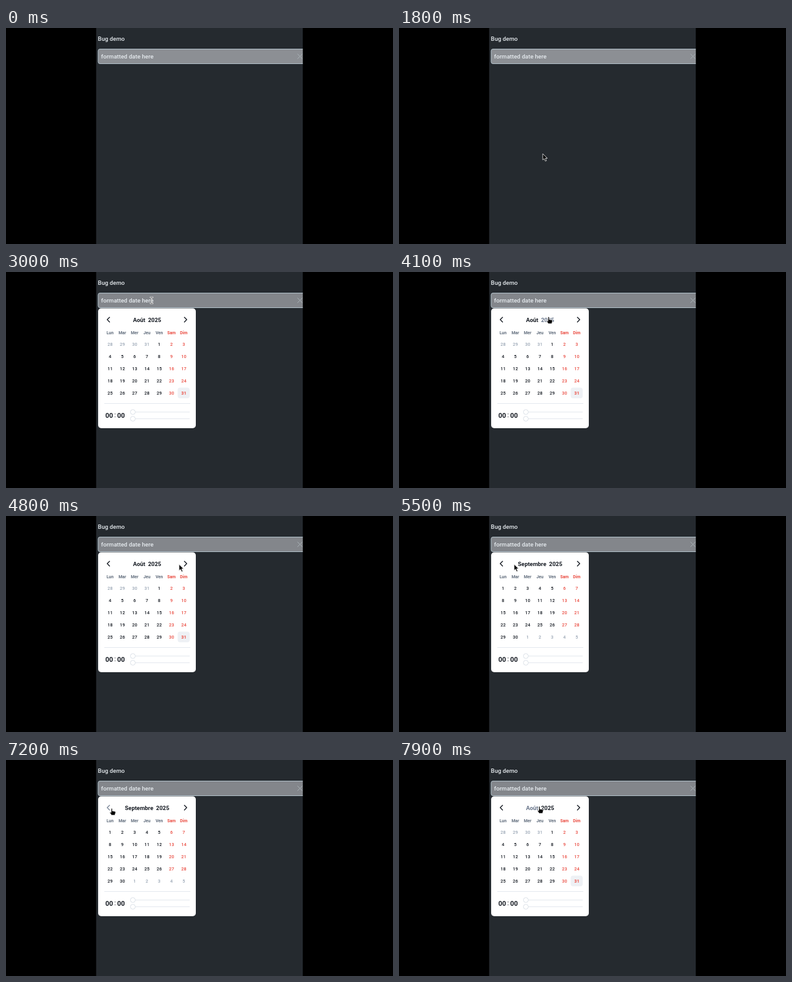
Animation of 630x354 px, one loop 8000 ms. Source, as an HTML page:

```html
<!DOCTYPE html>
<html lang="fr">
<head>
<meta charset="utf-8">
<title>Bug demo</title>
<style>
  html, body { margin: 0; width: 100%; height: 100%; overflow: hidden; background: #000; }
  svg { display: block; width: 100%; height: 100%; font-family: Roboto, "Noto Sans", sans-serif; }
  .label { font-size: 9.6px; font-weight: 500; fill: #e6ebef; }
  .field { fill: #8c8f94; stroke: #b4c3cc; }
  .clear { fill: none; stroke: #a8b2b6; }
  .focus .field { fill: #83868b; }
  #calendar text { text-anchor: middle; fill: #151a22; }
  #calendar .head { font-size: 9.4px; font-weight: 700; }
  #calendar .name { font-size: 6.9px; font-weight: 700; fill: #5f6b7b; }
  #calendar .day { font-size: 7.3px; font-weight: 500; }
  #calendar .clock { font-size: 10.8px; font-weight: 700; }
  #calendar .weekend { fill: #ea4b40; }
  #calendar .muted { fill: #9aa6b5; }
  #calendar .today { font-weight: 700; }
  #calendar tspan.hover { fill: #68758a; }
  .chevron { fill: none; stroke: #151a22; stroke-width: 1.4; stroke-linecap: round; stroke-linejoin: round; }
  .chevron.hover { stroke: #7c8899; }
  .line { fill: none; stroke: #e3e8ee; }
  .thumb { fill: #fff; stroke: #dbe1e8; }
  #pointer > * { fill: #050505; stroke: #f4f4f4; stroke-width: .8; stroke-linejoin: round; }
</style>
</head>
<body>
<svg viewBox="0 0 630 354">
  <defs><clipPath id="panel"><rect x="146.5" width="336.7" height="354"/></clipPath></defs>
  <g id="app" clip-path="url(#panel)">
    <rect x="146.5" width="337" height="354" fill="#252a2f"/>
    <text class="label" x="149.6" y="21">Bug demo</text>
    <rect class="field" x="150" y="34.5" width="345" height="24" rx="3"/>
    <text class="label" x="154.8" y="49.8">formatted date here</text>
    <path class="clear" d="M474.5 42.5l8 8m0-8l-8 8"/>
  </g>
  <g id="calendar">
    <rect x="150" y="59.5" width="159" height="196.5" rx="5" fill="#fff"/>
    <path id="prev" class="chevron" d="M168.6 74.3l-3.8 3.8 3.8 3.8"/>
    <path id="next" class="chevron" d="M290.4 74.3l3.8 3.8-3.8 3.8"/>
    <text class="head" x="229.7" y="81.5"><tspan id="month"></tspan><tspan id="year" dx="4.6">2025</tspan></text>
    <rect id="mark" x="279.5" y="189.5" width="19.5" height="17.5" rx="4" fill="#eef1f5"/>
    <g id="names"></g>
    <g id="grid"></g>
    <path class="line" d="M160 215.5H300"/>
    <text class="clock" x="168" y="238.6">00</text>
    <text class="clock" x="177.6" y="238" style="font-weight:400">:</text>
    <text class="clock" x="187.3" y="238.6">00</text>
    <path class="line" d="M210 229.5h89M210 240.5h89"/>
    <circle class="thumb" cx="206.5" cy="229.5" r="4"/>
    <circle class="thumb" cx="206.5" cy="240.5" r="4"/>
  </g>
  <g id="pointer">
    <path id="arrow" d="M0 0V10.2L2.4 8.2 4.2 12.2 6 11.4 4.3 7.5H7.5Z"/>
    <path id="hand" d="M-1 1Q0-.8 1 1V4.4L5.4 5.2Q6.6 5.6 6.3 7.4L5.2 11.4H-.4L-3 7.4Q-3.2 6-1 7Z"/>
    <path id="beam" d="M-2.5-5.5H2.5V-4.5H.6V4.5H2.5V5.5H-2.5V4.5H-.6V-4.5H-2.5Z"/>
  </g>
</svg>
<script>
const LOOP = 8000, STEP = 100, APPEAR = 800, OPEN = 2700;
const AUGUST = 7;
const byId = id => document.getElementById(id);

const PREV = { x: 167, y: 79 }, NEXT = { x: 294, y: 79 };
const REST = { x: 234, y: 206 }, FIELD = { x: 237, y: 46.5 };
const YEAR = { x: 245, y: 80 }, MONTH = { x: 228.5, y: 76 };
const MOVES = [
  { from: 800, to: 1000, goal: REST },
  { from: 1800, to: 2700, goal: FIELD },
  { from: 3600, to: 4500, goal: YEAR },
  { from: 4600, to: 5000, goal: NEXT, click: 5200 },
  { from: 5200, to: 5700, goal: PREV, click: 5900 },
  { from: 5900, to: 6700, goal: NEXT, click: 6800 },
  { from: 6800, to: 7300, goal: PREV, click: 7500 },
  { from: 7500, to: 7900, goal: MONTH }
];
const easeOut = k => 1 - (1 - k) ** 2;
const clamp = k => Math.min(1, Math.max(0, k));

function pointerAt(t) {
  let x = 235, y = 249;
  for (const { from, to, goal } of MOVES) {
    const k = easeOut(clamp((t - from) / (to - from)));
    x += (goal.x - x) * k;
    y += (goal.y - y) * k;
  }
  return { x, y };
}

function addText(parent, cls, column, y, content) {
  const node = document.createElementNS('http://www.w3.org/2000/svg', 'text');
  node.setAttribute('class', cls);
  node.setAttribute('x', 169.4 + 20 * column);
  node.setAttribute('y', y);
  node.textContent = content;
  parent.append(node);
}

['Lun', 'Mar', 'Mer', 'Jeu', 'Ven', 'Sam', 'Dim'].forEach((name, i) =>
  addText(byId('names'), 'name' + (i > 4 ? ' weekend' : ''), i, 101.6, name));

let shown;
function showMonth(month) {
  if (month === shown) return;
  shown = month;
  const lead = (new Date(2025, month, 1).getDay() + 6) % 7;
  byId('grid').textContent = '';
  for (let i = 0; i < 35; i++) {
    const date = new Date(2025, month, i - lead + 1), column = i % 7;
    const outside = date.getMonth() !== month;
    let cls = 'day';
    if (outside) cls += ' muted';
    else if (column > 4) cls += ' weekend';
    if (!outside && date.getDate() === 31) cls += ' today';
    addText(byId('grid'), cls, column, 120.8 + 20 * Math.floor(i / 7), date.getDate());
  }
  byId('month').textContent = month === AUGUST ? 'Août' : 'Septembre';
  byId('mark').style.display = month === AUGUST ? '' : 'none';
}

function hoveredPart({ x, y }) {
  if (y < 70 || y > 87) return null;
  if (Math.abs(x - 167) < 8) return 'prev';
  if (Math.abs(x - 292) < 8) return 'next';
  const monthWidth = byId('month').getComputedTextLength();
  const yearWidth = byId('year').getComputedTextLength();
  const left = 229.7 - (monthWidth + yearWidth + 4.6) / 2;
  if (x < left - 5 || x > left + monthWidth + yearWidth + 8) return null;
  return x < left + monthWidth + 2.5 ? 'month' : 'year';
}

function draw(t) {
  const point = pointerAt(t), open = t >= OPEN;
  const clicks = MOVES.filter(move => move.click <= t).length;
  showMonth(AUGUST + clicks % 2);
  byId('app').classList.toggle('focus', open);
  byId('calendar').style.opacity = clamp((t - OPEN) / 200);

  const hovered = open ? hoveredPart(point) : null;
  for (const id of ['prev', 'next', 'month', 'year'])
    byId(id).classList.toggle('hover', id === hovered);

  const overField = point.y > 35 && point.y < 58;
  const shape = hovered ? 'hand' : overField ? 'beam' : 'arrow';
  for (const id of ['arrow', 'hand', 'beam'])
    byId(id).style.display = id === shape ? '' : 'none';
  byId('pointer').style.display = t < APPEAR ? 'none' : '';
  byId('pointer').setAttribute('transform', `translate(${point.x} ${point.y})`);
}

const start = performance.now();
function tick() {
  const t = (performance.now() - start) % LOOP;
  draw(Math.floor(t / STEP) * STEP);
  requestAnimationFrame(tick);
}
tick();
</script>
</body>
</html>
```
